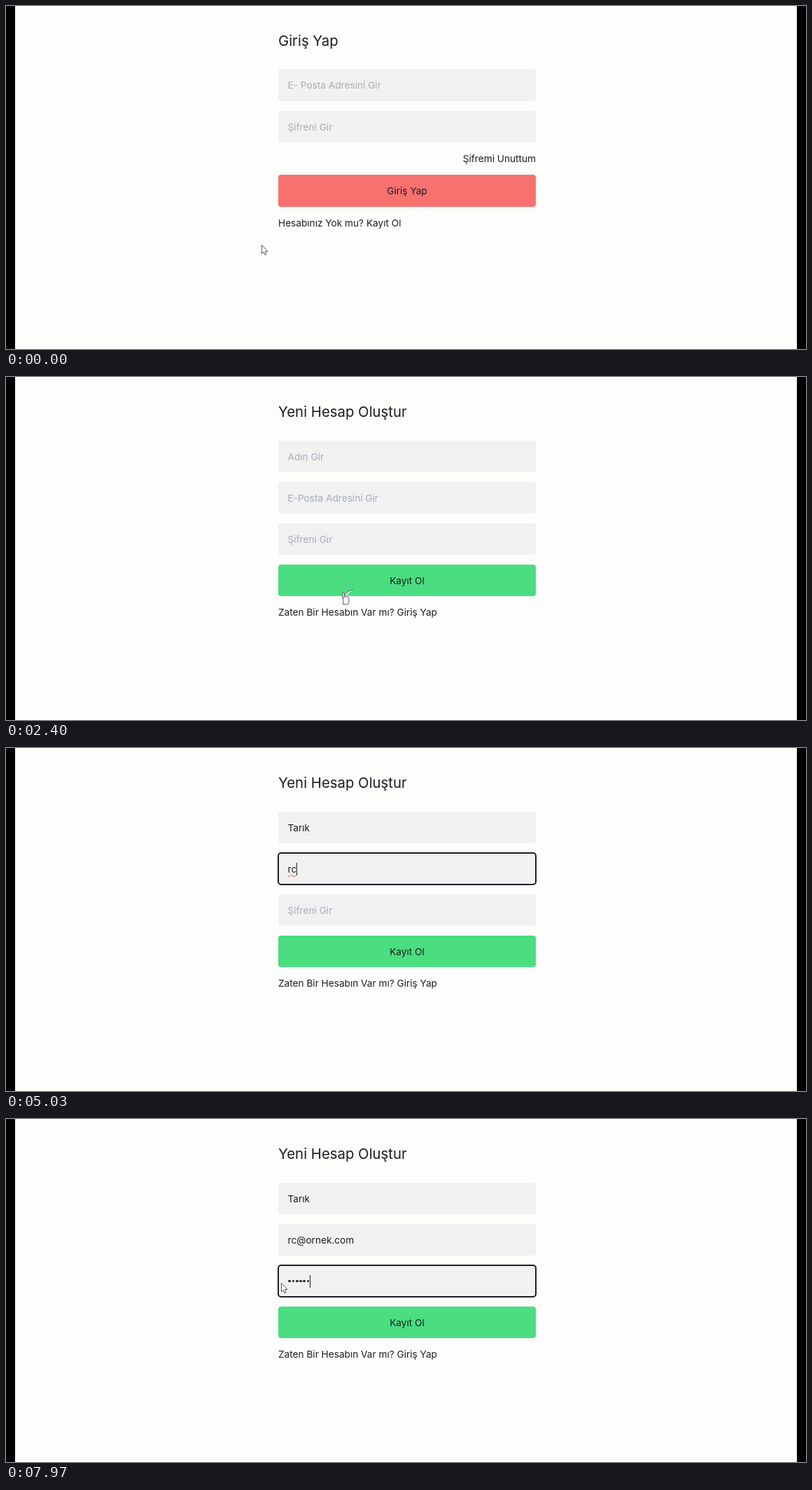
An HTML page for the animation above (8 s loop, 1143 by 490 pixels).

```html
<!DOCTYPE html>
<html lang="tr">
<head>
<meta charset="utf-8">
<title>Giriş Yap</title>
<style>
html, body { margin: 0; width: 100%; height: 100%; overflow: hidden; background: #fdfdfc; }
body { position: relative; font: 13.65px/20px Inter, "Open Sans", sans-serif; color: #1d1d1f; }
.bar { position: absolute; top: 0; width: 13px; height: 100%; background: #000; }
.text { position: absolute; white-space: pre; }
.title { font-size: 20.35px; }
.box { position: absolute; left: 389px; width: 368px; height: 45.5px; box-sizing: border-box;
  padding: 13px 13.5px; border-radius: 4px; white-space: pre; }
.field { background: #f1f1f2; }
.field.focus { outline: 2px solid #1f1d28; outline-offset: -1px; }
.hint { color: #a8acb7; }
#login .hint { color: #adadb2; }
.button { text-align: center; }
.caret { position: absolute; width: 1px; height: 18px; margin-top: 1px; background: #222; }
.dot { display: inline-block; width: 3.6px; height: 3.6px; margin: 0 .85px; border-radius: 50%;
  background: #222; vertical-align: 3.2px; }
.typo { text-decoration: underline wavy #e5484d 1px; text-decoration-skip-ink: none; text-underline-offset: 2px; }
svg { position: absolute; left: 0; top: 0; overflow: visible; }
svg path { fill: #fff; stroke: #55555c; stroke-width: 1; stroke-linejoin: round; }
</style>
</head>
<body>
<div class="bar" style="left:0"></div>
<div class="bar" style="left:1130px"></div>

<div id="login">
  <div class="text title" style="left:389px;top:40px">Giriş Yap</div>
  <div class="box field hint" style="top:90px">E- Posta Adresini Gir</div>
  <div class="box field hint" style="top:149.5px">Şifreni Gir</div>
  <div class="text" style="right:calc(100% - 757px);top:208px">Şifremi Unuttum</div>
  <div class="box button" style="top:241px;background:#f7716f">Giriş Yap</div>
  <div class="text" style="left:389px;top:300px">Hesabınız Yok mu? Kayıt Ol</div>
</div>

<div id="signup">
  <div class="text title" style="left:389px;top:40px">Yeni Hesap Oluştur</div>
  <div class="box field" style="top:90.5px"></div>
  <div class="box field" style="top:149.5px"></div>
  <div class="box field" style="top:208.5px"></div>
  <div class="box button" style="top:267.5px;background:#4ade80">Kayıt Ol</div>
  <div class="text" style="left:389px;top:326px">Zaten Bir Hesabın Var mı? Giriş Yap</div>
</div>

<svg id="pointer" width="16" height="20">
  <path id="arrow" d="M.5 .5V13L3.2 10.4L5 14.6L7 13.7L5.2 9.6H9Z"/>
  <path id="hand" d="M-1.2 8.8V1Q-1.2-.6 0-.6T1.2 1V5.5Q2.4 4.7 3.6 6Q4.8 5.3 6 6.7Q8 6 8 8.5V12Q8 14 6.5 16.8H-.3Q-2-.2 13.8-4.6 10.2Q-5 8.6-3.3 8.3Q-2.2 8.2-1.2 9.8Z"/>
</svg>

<script>
const LOOP = 8000, SWITCH = 2400, SPELLED = 5000;
const $ = id => document.getElementById(id);

const fields = [
  { hint: "Adın Gir", text: "Tarık", from: 2900, to: 3830, keys: [3100, 3330, 3470, 3550, 3630] },
  { hint: "E-Posta Adresini Gir", text: "rc@ornek.com", from: 3830, to: 6400,
    keys: [4100, 4430, 5300, ...Array.from({ length: 9 }, (_, i) => 5770 + i * 60)] },
  { hint: "Şifreni Gir", text: "••••••", from: 6400, to: LOOP, keys: [6730, 7000, 7200, 7260, 7315, 7370] }
];
document.querySelectorAll("#signup .field").forEach((el, i) => fields[i].el = el);

// time, x, y of the pointer tip
const path = [
  [0, 365, 341], [30, 365, 341], [230, 930, 250], [370, 930, 250], [470, 961, 234],
  [620, 945, 240], [900, 660, 285], [1200, 487, 304], [1500, 487, 304], [1600, 482, 308],
  [2600, 482, 308], [2880, 393, 114], [7840, 393, 114], [7970, 393, 234], [LOOP, 393, 234]
];
const links = {
  login: [[389, 302, 563, 318], [651, 210, 757, 226], [389, 241, 757, 287]],
  signup: [[389, 268, 757, 313], [389, 328, 617, 344]]
};

function pointerAt(t) {
  const i = path.findIndex(p => p[0] > t);
  const [a, b] = [path[i - 1], path[i]];
  const k = (t - a[0]) / (b[0] - a[0]);
  return [1, 2].map(n => a[n] + (b[n] - a[n]) * k);
}

function caretOn(idle) {
  return idle < 330 || Math.floor((idle - 330) / 265) % 2 === 1;
}

function drawField(f, t) {
  const typed = f.keys.filter(k => k <= t);
  const focus = t >= f.from && t < f.to;
  let html = f.text.slice(0, typed.length).replace(/•/g, '<span class="dot"></span>');
  if (focus && f === fields[1] && t >= SPELLED)
    html = `<span class="typo">${html.slice(0, 2)}</span>${html.slice(2)}`;
  if (focus && caretOn(t - (typed.at(-1) ?? f.from))) html += '<span class="caret"></span>';
  if (!typed.length) html += `<span class="hint">${f.hint}</span>`;
  f.el.classList.toggle("focus", focus);
  if (html !== f.html) f.el.innerHTML = f.html = html;
}

function draw(t) {
  const page = t < SWITCH ? "login" : "signup";
  for (const id in links) $(id).style.display = id === page ? "" : "none";
  fields.forEach(f => drawField(f, t));

  const [x, y] = pointerAt(t);
  const over = links[page].some(([l, top, r, b]) => x >= l && x <= r && y >= top && y <= b);
  const hidden = t >= fields[0].keys[0] && t < 7870;
  $("pointer").style.display = hidden ? "none" : "";
  $("pointer").style.transform = `translate(${x}px, ${y}px)`;
  $("arrow").style.display = over ? "none" : "";
  $("hand").style.display = over ? "" : "none";
}

const start = performance.now();
function frame() {
  draw((performance.now() - start) % LOOP);
  requestAnimationFrame(frame);
}
frame();
</script>
</body>
</html>
```
